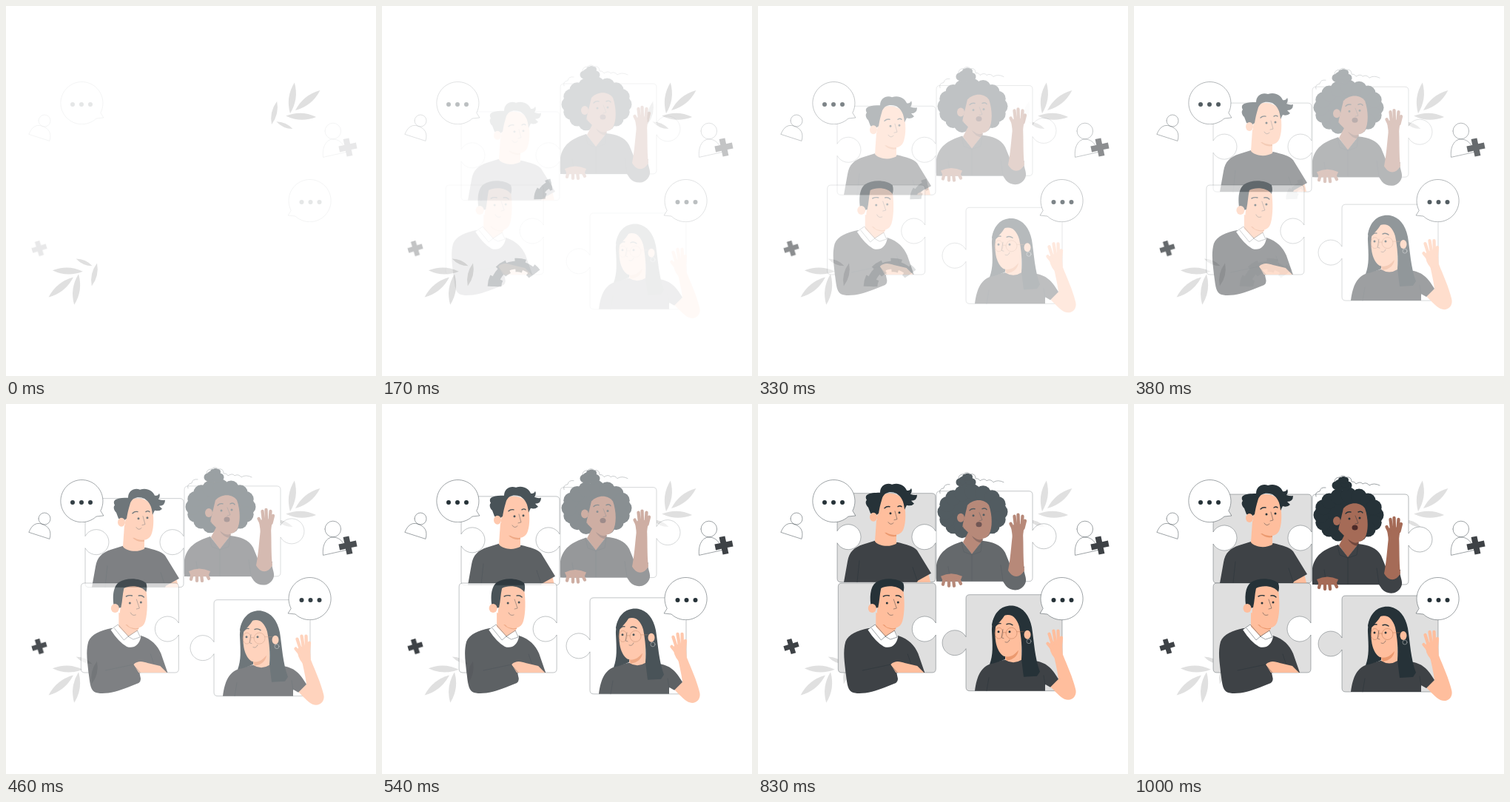
Animation, 500 px wide and 500 px high, one loop 1.04 s. Source, as an HTML page:

```html
<!DOCTYPE html>
<html lang="en">
<head>
<meta charset="utf-8">
<title>Puzzle team</title>
<style>
html, body { margin: 0; width: 100%; height: 100%; overflow: hidden; background: #fff }
svg { display: block; width: 100vw; height: 100vh }
.line { fill: none; stroke: #263238; stroke-width: .45; stroke-linecap: round; stroke-linejoin: round }
.brow { fill: none; stroke: #263238; stroke-width: 1.4; stroke-linecap: round }
.dots { fill: none; stroke: #263238; stroke-width: 3; stroke-linecap: round }
.bg { fill: #fff; stroke: #263238; stroke-width: .35 }
.hair { fill: #263238 }
.cloth { fill: #3e4246 }
.skin { fill: #ffbe9d }
.brown { fill: #a56b57 }
.shade { fill: #eb996f }
.white { fill: #fff }
.fingers { fill: none; stroke-width: 4.3; stroke-linecap: round }
#gears { fill: none; stroke: #263238 }
</style>
</head>
<body>
<svg viewBox="0 0 500 500">
  <defs>
    <path id="bubble" d="M26.500 12A28.600 28.600 0 1 0 20.500 20L30 19Z"/>
    <path id="plus" d="M-4-12H4V-4H12V4H4V12H-4V4H-12V-4H-4Z"/>
  </defs>

  <g id="leaves" fill="#e0e0e0"></g>
  <use href="#leaves" transform="rotate(180 241 253.7)"/>
  <path id="plate" class="white" d="M241 108H371V244H241Z"/>

  <g id="tl">
    <path class="bg" d="M112 122H235q5 0 5 5V173a17 17 0 1 0 0 16V237q0 5-5 5H112q-5 0-5-5V189a17 17 0 1 0 0-16V127q0-5 5-5Z"/>
    <path class="skin" d="M213 242L230 229 233 242Z"/>
    <path class="cloth" d="M116 242L121 214C123 201 130 195 142 191L158 186C166 194 180 194 188 188C200 191 210 193 215 199L234 230 216 240 215 242Z"/>
    <path class="line" d="M134 242L137 213M215 240L209 222"/>
    <path class="skin" d="M160 158L158 187C164 194 178 195 187 190V172Z"/>
    <path class="shade" d="M171 175Q178 182 187 180V176Z"/>
    <path class="skin" d="M164 126C175 119 192 121 197 133C200 145 200 160 197 169C194 179 184 180 175 176L160 164Z"/>
    <path class="hair" d="M152 149L149 141C145 137 145 133 147 131C143 124 149 121 165 121C165 111 174 107 181 110C190 107 198 111 201 118Q205 119 207 115Q209 119 206 123Q211 125 215 124Q215 132 207 132L211 136Q207 140 201 138L198 144C197 132 194 127 187 122C178 119 171 121 168 128C166 135 165 138 163 149L159 152Z"/>
    <ellipse class="skin" cx="156" cy="154" rx="5" ry="6"/>
    <path class="brow" d="M171 142q3-3 7-2M189 140q3-2 5 0"/>
    <path class="dots" d="M179 149h0M191 148h0"/>
    <path class="line" d="M185 146L188 157L184 158M176 161q3 5 7 1"/>
  </g>

  <g id="tr">
    <path class="bg" d="M246 122H366q5 0 5 5V175a17 17 0 1 1 0 16V239q0 5-5 5H246q-5 0-5-5V127q0-5 5-5Z"/>
    <g id="curls" class="hair"></g>
    <path class="line" d="M246 125q-2-6 5-7q1-6 8-5M271 105q0-6 7-6q4-4 9 0q7-1 7 6q4-1 6 3q6-4 9 0q5-3 9 2q6-4 14 0"/>
    <path class="brown" d="M287 172L277 191 289 208 303 189V178Z"/>
    <path fill="#70483e" d="M288 181Q298 191 304 186L303 192Q294 192 288 181Z"/>
    <path class="cloth" d="M241 244V222C244 205 256 196 276 190L289 207 303 189C318 191 328 194 334 205L341 222 360 224C357 230 365 240 361 247C356 258 342 258 335 250L331 244Z"/>
    <path class="line" d="M275 191L278 204 289 208 301 204 303 190M289 208V243M260 243L257 224M331 243L328 222"/>
    <path class="brown" d="M338 229C341 215 342 198 344 180L358 178C359 195 358 213 360 229C354 240 344 240 338 229Z"/>
    <path class="brown" d="M344 184L342 170 349 165 360 168 358 182Z"/>
    <path class="fingers" stroke="#a56b57" d="M345 173L341.500 166M348 169L346.500 156M352 168L351.500 154M356.500 169L357.500 156M358.500 172L361 162"/>
    <path class="brown" d="M283 141C291 132 306 132 312 141C317 155 317 172 312 181C306 189 296 187 288 182L276 170Z"/>
    <ellipse class="brown" cx="274" cy="158" rx="5" ry="6"/>
    <circle class="line" cx="271" cy="171" r="6"/>
    <path class="brow" d="M286 148q3-3 7-2M303 146q4-2 6 1"/>
    <path class="dots" d="M291 155h0M305 154h0"/>
    <path class="line" d="M299 151L303 161 299 162"/>
    <ellipse cx="298.500" cy="167" rx="4" ry="3.500" fill="#4b2a28"/>
    <path class="brown" d="M247 237Q261 230 276 237L273 244H250Z"/>
    <path class="fingers" stroke="#a56b57" d="M252 240L250 248M258 241V250M264 241L265 250M270 239L274 247"/>
  </g>

  <g id="bl">
    <path class="bg" d="M112 242H234q5 0 5 5V296a17 17 0 1 0 0 16V358q0 5-5 5H112q-5 0-5-5V247q0-5 5-5Z"/>
    <path class="cloth" d="M148 303C133 306 121 311 117 321C113 335 116 350 117 362C119 375 119 385 125 389C135 394 155 389 170 383L185 377Q189 374 187 368L186 363H224L215 337C210 326 203 318 188 313Z"/>
    <path class="skin" d="M178 352C184 346 191 348 197 350L214 354 223 363H185Z"/>
    <path class="line" d="M178 352L140 360M187 363L178 353M205 350L201 338"/>
    <path class="white" d="M147 305L157 298 171 314 183 306 188 314C186 326 178 331 169 328Q158 322 147 305Z"/>
    <path class="skin" d="M158 282V301L171 314 184 306V292Z"/>
    <path class="line" d="M147 305L157 298 171 314 165 319 152 303M171 314L183 306 187 315 178 318Z"/>
    <path class="shade" d="M167 298Q175 306 185 304V300Z"/>
    <path class="skin" d="M163 249C175 244 190 245 195 251C197 265 197 282 194 293C191 304 180 305 172 301L159 287Z"/>
    <path class="hair" d="M152 277C149 262 150 247 158 241C168 234 187 235 195 242Q197 248 195 254C190 246 174 244 165 249C163 258 163 266 161 275Z"/>
    <ellipse class="skin" cx="153" cy="276" rx="5.500" ry="6"/>
    <path class="brow" d="M168 260q4-2 8-1M185 259q4-1 7 2"/>
    <path class="dots" d="M173 269h0M188 268h0"/>
    <path class="line" d="M182 264L186 276 182 277M174 282q2 5 7 3"/>
  </g>

  <g id="br">
    <path class="bg" d="M286 259H406q5 0 5 5V384q0 5-5 5H286q-5 0-5-5V332a17 17 0 1 1 0-16V264q0-5 5-5Z"/>
    <path class="skin" d="M394 382C402 390 407 396 414 400C424 404 432 396 429 386C425 370 418 355 412 340L400 342C403 355 405 365 406 373Z"/>
    <path class="skin" d="M394 325Q402 318 411 326L412 342 401 345Q393 336 394 325Z"/>
    <path class="fingers" stroke="#ffbe9d" d="M398 333L391.500 325M398 326L393.500 312M402 324L399.500 308M406 324L405.500 308M409 328L410 317"/>
    <path class="cloth" d="M293 389C296 368 301 356 318 351L333 347 356 346 372 348C390 350 397 358 406 373L395 384 388 380V389Z"/>
    <path class="line" d="M309 389L312 371M388 381L386 368"/>
    <path class="hair" d="M336 277C322 279 316 292 316 308C317 328 318 340 313 353Q326 350 334 346L352 330V285Z"/>
    <path class="skin" d="M334 335V347Q345 354 356 347V325Z"/>
    <path class="shade" d="M334 342Q344 343 352 334Q350 346 336 348Z"/>
    <path class="skin" d="M321 303C324 287 338 282 348 290L360 305 356 325C350 340 341 345 332 342C322 336 319 318 321 303Z"/>
    <path class="hair" d="M319 304C325 298 332 290 335 284C343 285 350 291 353 302C356 318 357 330 356 346L359 370 377 369 381 363C374 345 373 322 370 303C367 287 358 276 346 274C331 272 319 281 316 300Z"/>
    <ellipse class="skin" cx="364" cy="313" rx="4.500" ry="6"/>
    <circle class="line" cx="366" cy="322" r="3" style="stroke:#ddd"/>
    <path class="brow" d="M322 300q3-3 6-2M336 299q4-2 8 1"/>
    <path class="dots" d="M325 309h0M340 309h0"/>
    <path class="line" style="stroke:#b0704f" d="M320 311a5.500 7.500 0 1 0 11 0a5.500 7.500 0 1 0-11 0M335 311a7.500 7.500 0 1 0 15 0a7.500 7.500 0 1 0-15 0M331 310h4M350 309h9"/>
    <path class="line" d="M331 306L329 317 332 318M334 323q4 2 6-3"/>
  </g>

  <g id="gears"></g>

  <g class="white">
    <use href="#bubble" x="101.500" y="132"/>
    <use href="#bubble" transform="translate(411.500 264) scale(-1 1)"/>
  </g>
  <g id="icons">
    <use class="line" href="#bubble" x="101.500" y="132"/>
    <use class="line" href="#bubble" transform="translate(411.500 264) scale(-1 1)"/>
    <path class="dots" style="stroke-width:6" d="M90 133h0m12 0h0m12 0h0M399.500 265h0m12 0h0m12 0h0"/>
    <path class="line" d="M44 155a8 8 0 1 0 16 0a8 8 0 1 0-16 0M31 173C35 163 41 160 48 162C58 165 62 172 59 182Z"/>
    <path class="line" d="M431 169a10.800 10.800 0 1 0 21.600 0a10.800 10.800 0 1 0-21.600 0M428.500 204C427 190 433 180 442 180C451 180 457 187 460 197Z"/>
    <use class="cloth" href="#plus" transform="translate(462 191) rotate(-12)"/>
    <use class="cloth" href="#plus" transform="translate(45 327.500) rotate(-17) scale(.84)"/>
  </g>
</svg>
<script>
const LOOP = 1040, FRAMES = 25;
const $ = id => document.getElementById(id);
const clamp = v => Math.max(0, Math.min(1, v));
const smooth = v => { v = clamp(v); return v * v * (3 - 2 * v); };

// Leaf growing from position p on the twig, at an angle in degrees
function leaf(p, angle, length) {
  const x = 391 - 32 * p, y = 141 + 19 * p, w = length * .22;
  return `<path transform="translate(${x} ${y}) rotate(${angle})" d="M0 0Q${length / 2} ${-w} ${length} 0Q${length / 2} ${w} 0 0Z"/>`;
}
$('leaves').innerHTML = leaf(0, -39, 43) + leaf(.22, -82, 42) + leaf(.4, 2, 41)
  + leaf(.8, 24, 24) + leaf(1, -77, 32);

// Fluffy hair: an ellipse edged with n curls
function puff(cx, cy, rx, ry, r, n) {
  let out = `<ellipse cx="${cx}" cy="${cy}" rx="${rx}" ry="${ry}"/>`;
  for (let i = 0; i < n; i++) {
    const a = i / n * 2 * Math.PI;
    out += `<circle cx="${cx + rx * Math.cos(a)}" cy="${cy + ry * Math.sin(a)}" r="${r}"/>`;
  }
  return out;
}
$('curls').innerHTML = puff(290, 150, 37, 27, 10.5, 16) + puff(281, 110, 8, 3, 5.5, 6) + puff(283, 103, 3, 1, 4, 4);

// Part of a gear: a solid rim and a dashed arc for its teeth
const gear = (arc, rim) => `<path d="${arc}" stroke-width="${rim}"/><path d="${arc}" stroke-width="${rim * 1.7}" stroke-dasharray="12 10"/>`;
$('gears').innerHTML = gear('M152 379A30 30 0 0 1 206 362', 11) + gear('M213 261A20 20 0 0 1 229 241', 9);

function place(id, x, y, alpha) {
  $(id).setAttribute('transform', `translate(${x} ${y})`);
  $(id).setAttribute('opacity', alpha);
}

function draw(now) {
  const t = Math.floor(now % LOOP / LOOP * FRAMES) / (FRAMES - 1);
  const d = 50 * (1 - t) * (2 / 3 - t);   // slides in, overshoots and settles
  const alpha = clamp(2 * t - .25);
  place('tl', 0, d, alpha);
  place('tr', 0, 20.5 * (t - 1), t);
  place('bl', -d, 0, alpha);
  place('br', 0, d, alpha);
  for (const id of ['tl', 'bl', 'br'])
    $(id).querySelector('.bg').style.fill = alpha > .9 ? '#dfdfdf' : '#fff';
  $('plate').setAttribute('opacity', clamp(3 * t));
  $('gears').setAttribute('opacity', .2 * Math.sin(Math.PI * clamp(2.5 * t)));
  $('icons').setAttribute('opacity', .12 + .88 * smooth(t / .55));
  requestAnimationFrame(() => draw(performance.now() - start));
}
const start = performance.now();
draw(0);
</script>
</body>
</html>
```
